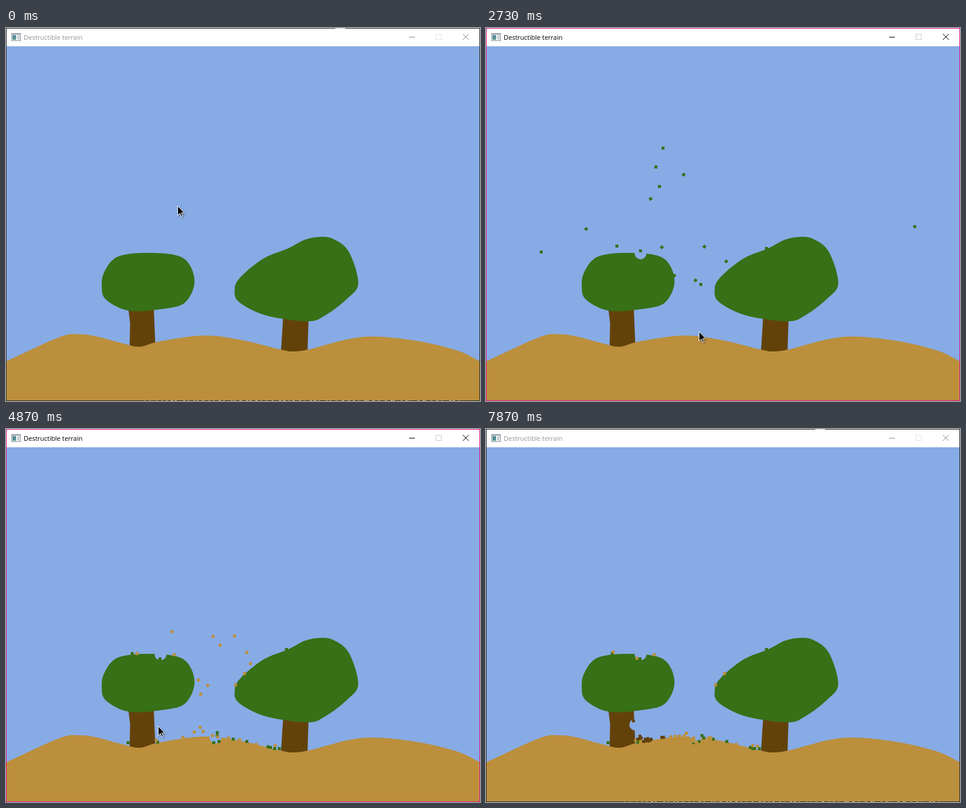
Recreate the animation shown at these times as an HTML page with a canvas. Size 802 by 632 pixels, loop 7940 ms.

```html
<!DOCTYPE html>
<html lang="en">
<head>
<meta charset="utf-8">
<title>Destructible terrain</title>
<style>
  html, body { margin: 0; width: 802px; height: 632px; overflow: hidden; background: #fff; }
  canvas { display: block; }
  #title {
    position: absolute; left: 30px; top: 8px; white-space: nowrap;
    font: 11px/16px "Open Sans", "Noto Sans", sans-serif;
  }
</style>
</head>
<body>
<canvas id="stage" width="802" height="632"></canvas>
<div id="title">Destructible terrain</div>
<script>
const ctx = document.getElementById('stage').getContext('2d');
const title = document.getElementById('title');

const LOOP = 7940, RATE = 15, LAST = 118;
const GRAVITY = 390, STEP = 1 / 60, CRATER = 10;
const SKY = '#87abe5', LEAF = '#377016', SAND = '#bb8f3c', WOOD = '#63420a';

const noise = n => { const v = Math.sin(n * 12.9898 + 4.1) * 43758.5453; return v - Math.floor(v); };

function pairs(list) {
  const out = [];
  for (let i = 0; i < list.length; i += 2) out.push([list[i], list[i + 1]]);
  return out;
}

// Smooth line through the points; an open one is filled down to the floor
function curve(list, closed) {
  const p = pairs(list), n = p.length;
  const at = i => closed ? p[(i + n) % n] : p[Math.max(0, Math.min(n - 1, i))];
  const path = new Path2D();
  path.moveTo(...p[0]);
  for (let i = 0; i < (closed ? n : n - 1); i++) {
    const [a, b, c, d] = [at(i - 1), at(i), at(i + 1), at(i + 2)];
    path.bezierCurveTo(b[0] + (c[0] - a[0]) / 6, b[1] + (c[1] - a[1]) / 6,
      c[0] - (d[0] - b[0]) / 6, c[1] - (d[1] - b[1]) / 6, ...c);
  }
  if (!closed) { path.lineTo(802, 632); path.lineTo(0, 632); }
  path.closePath();
  return path;
}

function polygon(list) {
  const path = new Path2D();
  pairs(list).forEach(p => path.lineTo(...p));
  path.closePath();
  return path;
}

const scenery = [
  [polygon([207,476, 210,500, 209,545, 253,545, 250,474]), WOOD],
  [polygon([469,488, 465,552, 510,552, 512,490]), WOOD],
  [curve([162,437, 167,412, 190,387, 245,381, 300,390, 319,428, 303,465, 265,476,
    208,479, 169,460], true), LEAF],
  [curve([387,442, 397,422, 435,391, 478,373, 505,359, 530,354, 553,357, 580,379, 596,432,
    578,458, 540,487, 510,497, 440,487, 394,464], true), LEAF],
  [curve([0,565, 90,524, 125,519, 155,523, 200,535, 227,540, 260,531, 335,521, 400,529,
    465,545, 487,548, 515,544, 580,527, 630,523, 700,531, 765,547, 802,565], false), SAND]
];

// Each blast digs a crater and throws bits; u runs from -1 to 1 and r is random
const blasts = [
  { time: 1, x: 261, y: 382, color: LEAF, count: 21,
    speed: (u, r) => [20 + 340 * u ** 3, -150 - 310 * r ** .6] },
  { time: 3.53, x: 354, y: 523, color: SAND, count: 24,
    speed: (u, r) => [-15 + 95 * u, -80 - 320 * r] },
  { time: 5.5, x: 252, y: 501, color: WOOD, count: 19,
    speed: (u, r) => [28 + 24 * u + 80 * Math.max(0, u) ** 8, 20 - 100 * r] }
];

const settled = [];

function solid(x, y, t) {
  if (settled.some(s => s.time < t && Math.abs(s.x - x) < 3 && Math.abs(s.y - y) < 3)) return true;
  if (blasts.some(b => b.time <= t && Math.hypot(b.x - x, b.y - y) < CRATER)) return false;
  return scenery.some(([path]) => ctx.isPointInPath(path, x, y));
}

// Direction in which the ground around a point is open
function openSide(x, y, t) {
  let nx = 0, ny = 0;
  for (let a = 0; a < 2 * Math.PI; a += Math.PI / 8) {
    if (solid(x + 5 * Math.cos(a), y + 5 * Math.sin(a), t)) continue;
    nx += Math.cos(a);
    ny += Math.sin(a);
  }
  const size = Math.hypot(nx, ny);
  return size > .1 ? [nx / size, ny / size] : [0, -1];
}

// Thrown bits fall, bounce weakly and stay where they come to rest
function simulate(blast, i) {
  const seed = i + blast.x;
  let x = blast.x + (noise(seed) - .5) * 8, y = blast.y + (noise(seed + .3) - .5) * 6;
  let [vx, vy] = blast.speed(2 * i / (blast.count - 1) - 1, noise(seed + .6));
  const track = [[x, y]];
  for (let t = blast.time, hits = 0; t < LOOP / 1000 && hits < 4; t += STEP) {
    const speed = Math.hypot(vx, vy) || 1;
    if (solid(x + 3 * vx / speed, y + 3 * vy / speed, t)) {
      const [nx, ny] = openSide(x, y, t), into = vx * nx + vy * ny;
      if (into < 0) {
        vx = (vx - into * nx) * .6 - into * nx * .35;
        vy = (vy - into * ny) * .6 - into * ny * .35;
      }
      if (++hits === 4 || Math.hypot(vx, vy) < 30) {
        settled.push({ x, y, time: t });
        break;
      }
    }
    x += vx * STEP;
    y += vy * STEP + GRAVITY * STEP * STEP / 2;
    vy += GRAVITY * STEP;
    track.push([x, y]);
  }
  const restAngle = blast.color === WOOD && i % 3 === 0 ? noise(seed) * 1.5 : 0;
  return { blast, track, restAngle, phase: noise(seed + 5) * 3, spin: (noise(seed + 9) - .5) * 9 };
}

const bits = blasts.flatMap(b => Array.from({ length: b.count }, (_, i) => simulate(b, i)));

function drawBit({ blast, track, restAngle, phase, spin }, t) {
  if (t < blast.time) return;
  const k = Math.round((t - blast.time) / STEP), end = track.length - 1;
  const [x, y] = track[Math.min(k, end)];
  ctx.save();
  ctx.translate(Math.round(x) + .5, Math.round(y) + .5);
  ctx.rotate(k < end ? phase + spin * t : restAngle);
  box(blast.color, -2.5, -2.5, 5, 5);
  ctx.restore();
}

function box(color, x, y, w, h) {
  ctx.fillStyle = color;
  ctx.fillRect(x, y, w, h);
}

function drawFrame(active) {
  box('#fff', 0, 0, 802, 31);
  // Window icon
  box('#8a9196', 9, 9, 16, 13);
  box('#f4f6f7', 10, 11, 14, 10);
  const tint = ctx.createLinearGradient(11, 12, 17, 20);
  tint.addColorStop(0, '#4b7d96');
  tint.addColorStop(1, '#5f9f8d');
  box(tint, 11, 12, 6, 8);
  box('#c9d0d4', 19, 12, 4, 8);

  const ink = active ? '#000' : '#8c8c8c';
  box(ink, 682, 15, 10, 1);
  ctx.lineWidth = 1;
  ctx.strokeStyle = active ? '#ccc' : '#e6e6e6';
  ctx.strokeRect(727.5, 10.5, 9, 9);
  ctx.strokeStyle = ink;
  ctx.beginPath();
  ctx.moveTo(773, 10); ctx.lineTo(783, 20);
  ctx.moveTo(783, 10); ctx.lineTo(773, 20);
  ctx.stroke();

  ctx.strokeStyle = active ? '#e3108c' : '#2b2b2b';
  ctx.strokeRect(.5, .5, 801, 631);
  if (!active) {
    box('#d0d0d0', 557, 0, 17, 1);
    for (let i = 0; i < 60; i++) box('#b9b3a4', 232 + Math.floor(i * 9 + noise(i) * 6), 631, 1 + noise(i + 20) * 3, 1);
  }
  title.style.color = active ? '#000' : '#939393';
}

// Pointer moves: start, end, then where it arrives
const moves = [[0, .13, 280, 387], [.27, .9, 261, 381], [1.53, 2.6, 360, 514], [2.8, 3.3, 354, 523],
  [4.2, 4.8, 257, 503], [4.87, 5.1, 251, 502], [5.6, 6.4, 258, 536], [6.5, 6.85, 184, 593]];
const arrow = polygon([.5,.5, .5,16.5, 4.2,13, 6.8,18.5, 9,17.5, 6.6,12.2, 11.5,12.2]);

function drawPointer(t) {
  if (t > 6.85) return;
  let x = 290, y = 301;
  for (const [from, to, toX, toY] of moves) {
    const p = Math.max(0, Math.min(1, (t - from) / (to - from)));
    const ease = p * p * (3 - 2 * p);
    x += (toX - x) * ease;
    y += (toY - y) * ease;
  }
  ctx.save();
  ctx.translate(Math.round(x), Math.round(y));
  ctx.shadowColor = 'rgba(0,0,0,.45)';
  ctx.shadowBlur = 3;
  ctx.shadowOffsetX = ctx.shadowOffsetY = 2;
  ctx.fillStyle = '#000';
  ctx.fill(arrow);
  ctx.shadowColor = 'transparent';
  ctx.strokeStyle = '#fff';
  ctx.lineWidth = 1;
  ctx.stroke(arrow);
  ctx.restore();
}

function draw(t) {
  box(SKY, 0, 31, 802, 601);
  for (const [path, color] of scenery) {
    ctx.fillStyle = color;
    ctx.fill(path);
  }
  ctx.fillStyle = SKY;
  for (const { time, x, y } of blasts) {
    if (t < time) continue;
    ctx.beginPath();
    ctx.arc(x + .5, y, CRATER, 0, Math.PI * 2);
    ctx.fill();
  }
  bits.forEach(bit => drawBit(bit, t));
  drawFrame(t > .26 && t < 7.79);
  drawPointer(t);
}

const start = performance.now();
function tick() {
  const ms = (performance.now() - start) % LOOP;
  // The picture advances in steps of a fifteenth of a second
  draw(Math.min(LAST, Math.floor((ms + 4) * RATE / 1000)) / RATE);
  requestAnimationFrame(tick);
}
tick();
</script>
</body>
</html>
```
